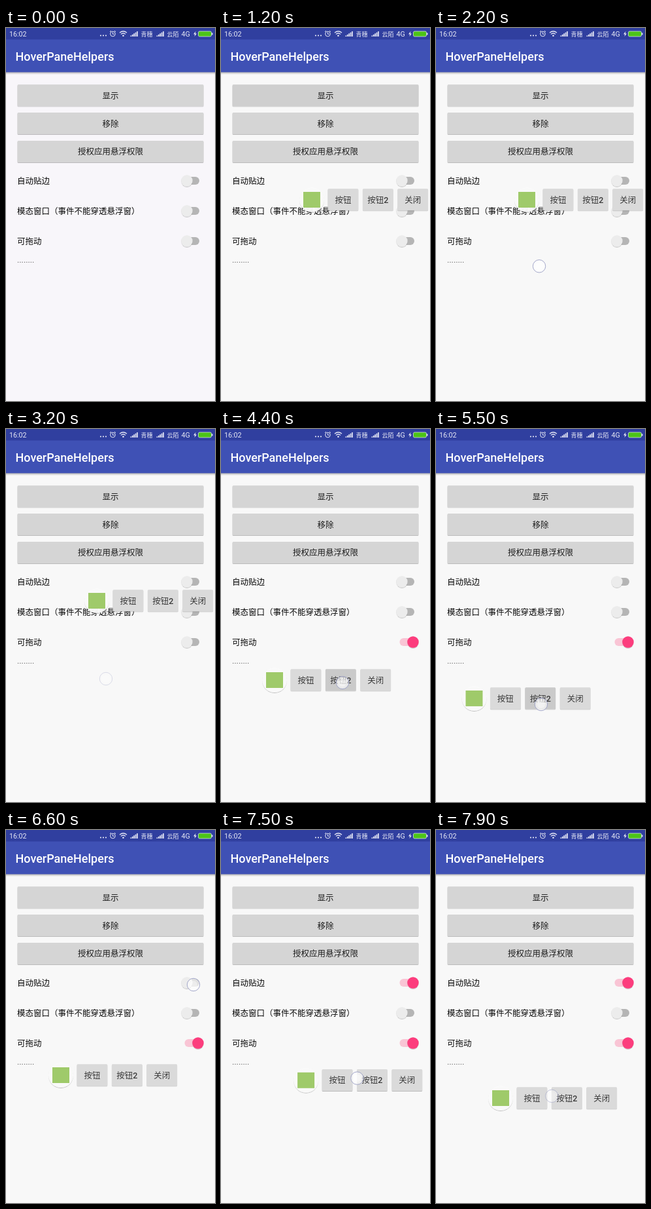
Write an HTML page that moves like this. It is 320 by 569 pixels and loops after 8000 ms.

```html
<!DOCTYPE html>
<html lang="zh-CN">
<head>
<meta charset="utf-8">
<title>Floating window demo</title>
<style>
html, body { margin: 0; width: 100%; height: 100%; overflow: hidden; background: #f8f8f8; }
svg { display: block; width: 100%; height: 100%; }
text { font-family: Roboto, "Noto Sans CJK SC", "Noto Sans CJK", sans-serif; font-size: 12.5px; fill: #080808; }
.mid { text-anchor: middle; }
.bar text { fill: #e6e8f5; font-size: 9px; }
.bar .clock { font-size: 10.7px; }
.title { font-size: 18px; font-weight: 500; fill: #fff; }
</style>
</head>
<body>
<svg id="stage" viewBox="0 0 320 569"></svg>
<script>
const LOOP = 8, STEP = 0.1;
const LIGHT = '#e6e8f5';
const stage = document.getElementById('stage');

const rowY = i => 233 + 46 * i;
const rect = (x, y, w, h, fill, extra = '') =>
  `<rect x="${x}" y="${y}" width="${w}" height="${h}" fill="${fill}" ${extra}/>`;
const circle = (x, y, r, fill, extra = '') =>
  `<circle cx="${x}" cy="${y}" r="${r}" fill="${fill}" ${extra}/>`;
const text = (x, y, s, extra = '') => `<text x="${x}" y="${y}" ${extra}>${s}</text>`;

const button = (id, x, y, w, label, fill, ink) =>
  rect(x, y, w, 33, fill, `id="${id}" rx="1.5" filter="url(#lift)"`) +
  text(x + w / 2, y + 21.4, label, `class="mid" style="fill:${ink}"`);

const toggle = i =>
  rect(273.5, rowY(i) - 6, 22.5, 12, '#b5b5b5', `id="track${i}" rx="6"`) +
  circle(277, rowY(i), 8.7, '#ececec', `id="thumb${i}" filter="url(#lift)"`);

const signal = x => [0, 1, 2, 3, 4]
  .map(i => rect(x + i * 2.4, 11.5 - i * 1.6, 1.7, 1.5 + i * 1.6, LIGHT)).join('');

const statusBar = () => `<g class="bar">` +
  text(5, 13, '16:02', 'class="clock"') +
  [0, 1, 2].map(i => circle(145 + 4 * i, 11.5, 1.1, LIGHT)).join('') +
  `<g fill="none" stroke="${LIGHT}">
    <circle cx="163.5" cy="9" r="3.8"/>
    <path d="M163.5 6.5V9.3H165.5M159 6L161 4M168 6L166 4"/>
    <path d="M174 7.3Q179.5 2.7 185 7.3M176 9.5Q179.5 6.5 183 9.5" stroke-width="1.3"/>
  </g>` +
  circle(179.5, 11.7, 1.3, LIGHT) +
  signal(190.5) + text(206.5, 12.6, '青穗') +
  signal(230.5) + text(246.5, 12.6, '云陌') +
  text(268.5, 13, '4G', 'class="clock"') +
  `<path d="M290.5 5L287 9.5H289.3L288.5 13L292 8.5H289.8Z" fill="${LIGHT}"/>` +
  rect(294.5, 5, 20, 8, '#4cc417', `rx="2" stroke="${LIGHT}" stroke-width="0.7"`) +
  rect(315, 7.5, 1.5, 3, LIGHT) + `</g>`;

stage.innerHTML = `<defs>
  <filter id="lift" x="-20%" y="-20%" width="140%" height="150%">
    <feDropShadow dx="0" dy="0.8" stdDeviation="0.7" flood-opacity="0.3"/>
  </filter>
  <linearGradient id="fade" x2="0" y2="1">
    <stop stop-opacity="0.3"/><stop offset="1" stop-opacity="0"/>
  </linearGradient>
</defs>` +
  rect(0, 0, 320, 569, '#f8f8f8', 'id="page"') +
  rect(0, 67, 320, 4, 'url(#fade)') +
  rect(0, 17, 320, 50.4, '#3f51b5') + rect(0, 0, 320, 17.5, '#303f9f') + statusBar() +
  text(14.5, 49.5, 'HoverPaneHelpers', 'class="title"') +
  ['显示', '移除', '授权应用悬浮权限'].map((s, i) =>
    button('main' + i, 17.5, 86.3 + i * 42.8, 285, s, '#d5d5d5', '#1c1c1c')).join('') +
  ['自动贴边', '模态窗口（事件不能穿透悬浮窗）', '可拖动'].map((s, i) =>
    text(17, rowY(i) + 4.7, s) + toggle(i)).join('') +
  text(17, 358, '........', 'style="fill:#666"') +
  `<g id="panel">` +
  circle(0, 0, 19, '#fcfcfc', 'fill-opacity="0.93" filter="url(#lift)"') +
  rect(-13, -12, 26, 24, '#9fca6a') +
  ['按钮', '按钮<tspan font-weight="500">2</tspan>', '关闭'].map((s, i) =>
    button('float' + i, 24.5 + i * 53.4, -16.8, 46.8, s, '#dadada', '#3a3a3a')).join('') +
  `</g><g id="finger">` +
  circle(0, 0, 9.7, '#fff', 'fill-opacity="0.6" stroke="#9a9fc4" stroke-width="0.9"') +
  circle(0, 0, 6, '#fff', 'fill-opacity="0.4"') + `</g>`;

const el = {};
stage.querySelectorAll('[id]').forEach(n => el[n.id] = n);

const ramp = (t, from, span) => Math.min(1, Math.max(0, (t - from) / span));
const easeOut = p => 1 - (1 - p) ** 3;
const decay = (t, from, tau) => Math.exp(-Math.max(0, t - from) / tau);
const gray = v => `rgb(${[v, v, v].map(Math.round)})`;
const mix = (a, b, p) => `rgb(${a.map((v, i) => Math.round(v + (b[i] - v) * p))})`;

// Turning points of the first drag: time, x, y.
const DRAG = [
  [4, 139, 262], [4.4, 82, 383], [4.7, 64, 465], [5.1, 132, 369], [5.45, 60, 412], [5.9, 84, 374]
];

// Smooth curve through the points, at rest at both ends.
function spline(pts, t) {
  const last = pts.length - 1;
  const time = Math.min(pts[last][0], Math.max(pts[0][0], t));
  const n = Math.max(1, pts.findIndex(k => k[0] >= time));
  const slope = (i, c) => i === 0 || i === last ? 0 :
    (pts[i + 1][c] - pts[i - 1][c]) / (pts[i + 1][0] - pts[i - 1][0]);
  const a = pts[n - 1], b = pts[n], span = b[0] - a[0], p = (time - a[0]) / span, q = 1 - p;
  return [1, 2].map(c =>
    q * q * (1 + 2 * p) * a[c] + p * p * (3 - 2 * p) * b[c] +
    span * p * q * (q * slope(n - 1, c) - p * slope(n, c)));
}

// Free drag, then the snap to the right edge, then a second drag.
function panelAt(t) {
  const [x, y] = spline(DRAG, t);
  const pull = ramp(t, 7.4, 0.45);
  return [x + 55 * easeOut(ramp(t, 6.7, 0.4)) - 40 * pull, y + 35 * pull];
}

// The finger trails the panel by a moment.
const hold = (dx, dy) => t => {
  const [x, y] = panelAt(t - 0.015);
  return [x + dx, y + dy];
};
const swipe = t => {
  const p = easeOut(ramp(t, 1.4, 1.7));
  return [187 - 34 * p, 262 + 119 * p];
};
const TOUCHES = [
  { down: 0.5, up: 0.7, at: () => [166, 104] },
  { down: 1.4, up: 3.1, at: swipe },
  { down: 3.7, up: 3.8, at: () => [287, 327] },
  { down: 4, up: 5.8, at: hold(102.3, 8.5) },
  { down: 6.6, up: 6.6, at: () => [287, 236] },
  { down: 7.4, up: 7.85, at: hold(77, -2) }
];

function place(node, [x, y]) {
  node.setAttribute('transform', `translate(${x.toFixed(2)} ${y.toFixed(2)})`);
}

function setToggle(i, p) {
  el['thumb' + i].setAttribute('cx', 277 + 17 * p);
  el['thumb' + i].setAttribute('fill', mix([236, 236, 236], [252, 60, 125], p));
  el['track' + i].setAttribute('fill', mix([181, 181, 181], [249, 197, 213], p));
}

function drawFinger(t) {
  const touch = TOUCHES.findLast(k => k.down <= t);
  const alpha = touch ? decay(t, touch.up, 0.1) : 0;
  el.finger.setAttribute('opacity', alpha > 0.03 ? alpha : 0);
  if (touch) place(el.finger, touch.at(Math.min(t, touch.up)));
}

function draw(t) {
  el.page.setAttribute('fill', t < 0.5 ? '#f8f6fa' : '#f8f8f8');
  el.main0.setAttribute('fill', gray(213 - (t < 0.5 ? 0 : 16 * decay(t, 0.7, 0.5))));
  el.float1.setAttribute('fill', gray(t >= 4 && t < 5.9 ? 202 : 218));
  el.panel.setAttribute('visibility', t < 0.8 ? 'hidden' : 'visible');
  place(el.panel, panelAt(t));
  setToggle(0, ramp(t, 6.6, 0.3));
  setToggle(2, ramp(t, 3.7, 0.3));
  drawFinger(t);
}

const start = performance.now();
function tick() {
  const t = (performance.now() - start) / 1000 % LOOP;
  draw(Math.floor(t / STEP) / 10);
  requestAnimationFrame(tick);
}
tick();
</script>
</body>
</html>
```
